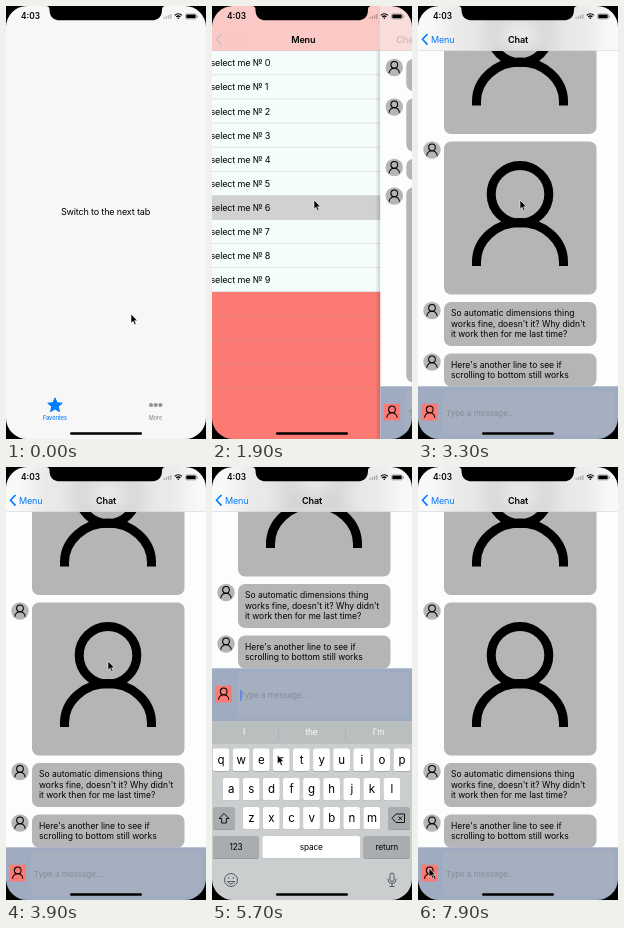
An HTML page that plays this animation: 200 by 433 pixels, repeating every 8000 ms.

```html
<!DOCTYPE html>
<html lang="en">
<head>
<meta charset="utf-8">
<title>Chat app</title>
<style>
html, body { margin: 0; width: 100%; height: 100%; overflow: hidden; background: #f7f7f7; }
svg { display: block; width: 100%; height: 100%; }
text { font: 9.07px Inter, Roboto, sans-serif; letter-spacing: -.02em; fill: #000; }
.mid { text-anchor: middle; }
.bold { font-weight: 600; }
.body { font-size: 8.53px; letter-spacing: 0; }
.blue { fill: #007aff; }
.tab { font-size: 5.5px; font-weight: 500; letter-spacing: 0; }
.key { font-size: 11.5px; }
.small { font-size: 8.3px; }
.line { fill: none; stroke: #000; }
</style>
</head>
<body>
<svg id="stage" viewBox="0 0 200 433" xmlns="http://www.w3.org/2000/svg"></svg>
<script>
const LOOP = 8000, KEYBOARD = 179, ROW = 24.1, GAP = 7.5;

const rect = (x, y, w, h, fill, r = 0) =>
  `<rect x="${x}" y="${y}" width="${w}" height="${h}" rx="${r}" fill="${fill}"/>`;
const text = (x, y, str, cls = '', attrs = '') =>
  `<text x="${x}" y="${y}" class="${cls}" ${attrs}>${str}</text>`;
const group = (id, inner, attrs = '') => `<g id="${id}" ${attrs}>${inner}</g>`;
const person = (x, y, scale = 1) =>
  `<use href="#person" transform="translate(${x} ${y}) scale(${scale})"/>`;

function home() {
  const star = Array.from({length: 10}, (_, i) => {
    const a = i * Math.PI / 5 - Math.PI / 2, r = i % 2 ? 3.4 : 7.6;
    return [49 + r * Math.cos(a), 399.5 + r * Math.sin(a)].map(v => v.toFixed(2));
  }).join(' ');
  const dots = [145, 149.7, 154.4].map(x => `<circle cx="${x}" cy="399" r="2.1" fill="#929292"/>`).join('');
  return rect(0, 0, 200, 433, '#f7f7f7') +
    text(99.5, 208.5, 'Switch to the next tab', 'mid') +
    `<polygon points="${star}" class="blue" stroke="#007aff" stroke-linejoin="round"/>` + dots +
    text(49, 413.5, 'Favorites', 'tab mid blue') +
    text(149.5, 413.5, 'More', 'tab mid', 'style="fill:#929292"');
}

function menu() {
  let out = rect(0, 0, 200, 433, '#fb7b74') + rect(0, 45, 200, ROW * 10, '#f5fcfc') +
    group('picked', rect(0, 45 + ROW * 6, 200, ROW, '#d0d2d2'));
  for (let i = 0; i < 14; i++) {
    const y = 45 + ROW * i;
    if (i < 10) out += text(8, y + 15.3, 'select me № ' + i);
    out += rect(8, y + ROW - .5, 192, .5, i < 10 ? '#c9cdcd' : '#dd8f8b');
  }
  return out;
}

const messages = [
  {h: 32, lines: ['Hello there, here is a line', 'of some text to read']},
  {h: 53, lines: ['This one is a longer message', 'that takes a few more lines', 'so the bubble has to grow', 'to fit all of it']},
  {h: 21, lines: ['Short one']},
  {h: 195}, {h: 153}, {h: 153},
  {h: 44, lines: ['So automatic dimensions thing', "works fine, doesn't it? Why didn't", 'it work then for me last time?']},
  {h: 33, lines: ["Here's another line to see if", 'scrolling to bottom still works']},
];
let bottom = 53;

function thread() {
  return messages.map(({h, lines}) => {
    const y = bottom;
    bottom += h + GAP;
    const content = lines
      ? lines.map((s, i) => text(33, y + h / 2 + 2.6 + (i - (lines.length - 1) / 2) * 10.2, s, 'body')).join('')
      : person(26, y + (h - 153) / 2);
    return rect(26, y, 152.5, h, '#b5b5b5', 7) + content +
      `<circle cx="14" cy="${y + 8.5}" r="8.7" fill="#b5b5b5"/>` + person(5.1, y - .3, .117);
  }).join('');
}

// Navigation bar background: a blurred copy of the thread under a white veil.
function frost() {
  return `<g clip-path="url(#bar)"><g filter="url(#blur)">${rect(-40, -60, 280, 200, '#fcfefe')}` +
    `<use href="#thread"/></g>${rect(0, 0, 200, 45, '#f8f8f8c8')}</g>`;
}

function inputBar() {
  return rect(0, 380.3, 200, 53, '#9eabc0') + rect(25, 384.5, 171.5, 45, '#a5afbf', 5) +
    rect(3.5, 397.8, 16.4, 16.6, '#fb7b74') + person(2.8, 397.3, .117) +
    text(28, 409.5, 'Type a message...', 'small', 'style="fill:#858c99;font-size:8px;letter-spacing:0"') +
    group('caret', rect(28.3, 402, 1, 11, '#3a6ff0'));
}

function keyboard() {
  const key = (x, y, w, label, fill = '#fff', cls = 'key') =>
    rect(x, y + .6, w, 22.5, '#8d9096', 2.6) + rect(x, y, w, 22.5, fill, 2.6) +
    text(x + w / 2, y + (cls === 'key' ? 15 : 14.3), label, cls + ' mid');
  const row = (letters, x, y) => [...letters].map((c, i) => key(x + i * 20.1, y, 16.8, c)).join('');
  const grey = '#a9adb0';
  return rect(0, 254, 200, 179, '#cacecf') + rect(0, 254, 200, 23, '#b9bebf') +
    rect(66, 258, .6, 15, '#a6aaae') + rect(133, 258, .6, 15, '#a6aaae') +
    [[32, 'I'], [99.5, 'the'], [166.5, "I'm"]].map(([x, s]) => text(x, 268.3, s, 'small mid', 'style="fill:#fff"')).join('') +
    row('qwertyuiop', .6, 281.5) + row('asdfghjkl', 10.7, 311) + row('zxcvbnm', 30.8, 340) +
    key(1, 340, 22, '', grey) + key(176, 340, 22, '', grey) +
    key(1, 369, 46, '123', grey, 'small') + key(50.3, 369, 98, 'space', '#fff', 'small') +
    key(151.5, 369, 46.5, 'return', grey, 'small') +
    '<path class="line" d="M12 346.5l5 5h-2.6v4.5h-4.8v-4.5h-2.6zM184 347h8.5v8.5h-8.5l-4-4.25zM186.5 349.5l3.6 3.6m0-3.6l-3.6 3.6" stroke-width=".9"/>' +
    '<g class="line" style="stroke:#555b63"><circle cx="19" cy="413" r="6.5"/><path d="M15.3 414.5q3.7 5 7.4 0zM16.8 410v1.8M21.2 410v1.8"/>' +
    '<rect x="178" y="406" width="4" height="8.5" rx="2"/><path d="M176 411.5v1a4 4 0 0 0 8 0v-1M180 416.5v3M177.5 419.5h5"/></g>';
}

function navBar() {
  return group('pink', rect(0, 0, 200, 45, '#fad8d6')) +
    rect(0, 44.6, 200, .4, '#c8c8c8') +
    group('menuTitle', text(0, 36.7, 'Menu', 'bold mid')) +
    group('chatTitle', text(0, 36.7, 'Chat', 'bold mid')) +
    group('back', '<path class="line" d="M9.5 28l-5 5.3 5 5.3" style="stroke:#007aff" stroke-width="1.6"/>') +
    group('backLabel', text(13, 36.6, 'Menu', 'blue'));
}

function device() {
  const signal = [0, 1, 2, 3].map(i => rect(157.5 + i * 2.2, 11 - i, 1.4, 2 + i, '#00000040', .4)).join('');
  return text(15, 13.2, '4:03', 'bold', 'style="font-size:8.3px;letter-spacing:0"') + signal +
    '<path class="line" d="M168.8 9.4a5 5 0 0 1 7 0M170.3 11a2.9 2.9 0 0 1 4 0" stroke-width="1.3"/><circle cx="172.3" cy="12.3" r=".8"/>' +
    '<rect x="179.5" y="7.8" width="11" height="5.2" rx="1.5" class="line" stroke-width=".5" opacity=".5"/>' +
    rect(180.3, 8.6, 9.4, 3.6, '#000', .8) + rect(191, 9.4, .8, 2, '#777', .4) +
    '<path d="M40 0q3.5 0 3.5 3.5q0 10.8 10.5 10.8h91.5q10.5 0 10.5-10.8q0-3.5 3.5-3.5z"/>' +
    rect(64, 426.3, 72, 2.4, '#000', 1.2) +
    '<path fill-rule="evenodd" d="M0 0h200v433h-200zM21 0a21 21 0 0 0-21 21v391a21 21 0 0 0 21 21h158a21 21 0 0 0 21-21v-391a21 21 0 0 0-21-21z"/>';
}

const stage = document.getElementById('stage');
stage.innerHTML = `<defs>
  <g id="person" class="line" stroke-width="9"><circle cx="76" cy="52.7" r="28.8"/><path d="M32.5 124.4v-3.9a43.5 39.5 0 0 1 87 0v3.9"/></g>
  <clipPath id="bar"><rect width="200" height="45"/></clipPath>
  <filter id="blur" filterUnits="userSpaceOnUse" x="-40" y="-60" width="280" height="200" color-interpolation-filters="sRGB"><feGaussianBlur stdDeviation="10"/></filter>
  <linearGradient id="shade"><stop stop-opacity="0"/><stop offset="1" stop-opacity=".16"/></linearGradient></defs>` +
  group('home', home()) +
  group('app', group('menu', menu()) +
    group('chat', rect(-5, 0, 5, 433, 'url(#shade)') + rect(0, 0, 200, 433, '#fcfefe') +
      group('thread', thread()) + frost() + group('input', inputBar())) +
    group('keyboard', keyboard()) + navBar()) +
  device() +
  group('cursor', '<path d="M0 0v9.2l2.1-2 1.5 3.5 1.5-.7-1.5-3.3h2.8z" stroke="#fff" stroke-width=".6"/>');

const el = {};
stage.querySelectorAll('g[id]').forEach(g => el[g.id] = g);
const move = (g, x, y = 0) => g.setAttribute('transform', `translate(${x.toFixed(2)} ${y.toFixed(2)})`);
const show = (g, on) => g.setAttribute('opacity', +on);

const scrollEnd = bottom - GAP - 380.5;

// Smooth progress from 0 to 1 between two times.
function ease(t, from, to) {
  const p = Math.min(1, Math.max(0, (t - from) / (to - from)));
  return p * p * (3 - 2 * p);
}

// Pointer moves: start, end, x, y.
const moves = [
  [50, 900, 150.5, 399],
  [1100, 1600, 102, 194],
  [3900, 4500, 48, 402],
  [5483, 5983, 91, 120],
  [6500, 7500, 11, 401],
];

function render(t) {
  let x = 125, y = 308;
  for (const [from, to, mx, my] of moves) {
    const p = ease(t, from, to);
    x += (mx - x) * p;
    y += (my - y) * p;
  }
  move(el.cursor, x, y);

  const push = ease(t, 1780, 2260);
  const lift = KEYBOARD * (ease(t, 4550, 4900) - ease(t, 6030, 6350));
  show(el.home, t < 1100);
  show(el.app, t >= 1100);
  show(el.picked, t >= 1750);
  move(el.menu, -60 * push);
  move(el.chat, 200 * (1 - push));
  move(el.thread, 0, -scrollEnd * ease(t, 2000, 2375) - lift);
  move(el.input, 0, -lift);
  move(el.keyboard, 0, KEYBOARD - lift);
  show(el.keyboard, lift > 0);
  show(el.caret, t > 4600 && t < 6050 && (t - 4600) % 1000 < 600 || t > 5500 && t < 6050);

  show(el.pink, 1 - push);
  move(el.menuTitle, 100 - 55 * push);
  show(el.menuTitle, Math.min(1, 1.4 * (1 - push)) * (push < 1));
  move(el.chatTitle, 100 + 112 * (1 - push));
  show(el.chatTitle, push);
  show(el.back, push);
  show(el.backLabel, push ** 3);
}

function tick() {
  render(performance.now() % LOOP);
  requestAnimationFrame(tick);
}
tick();
</script>
</body>
</html>
```
